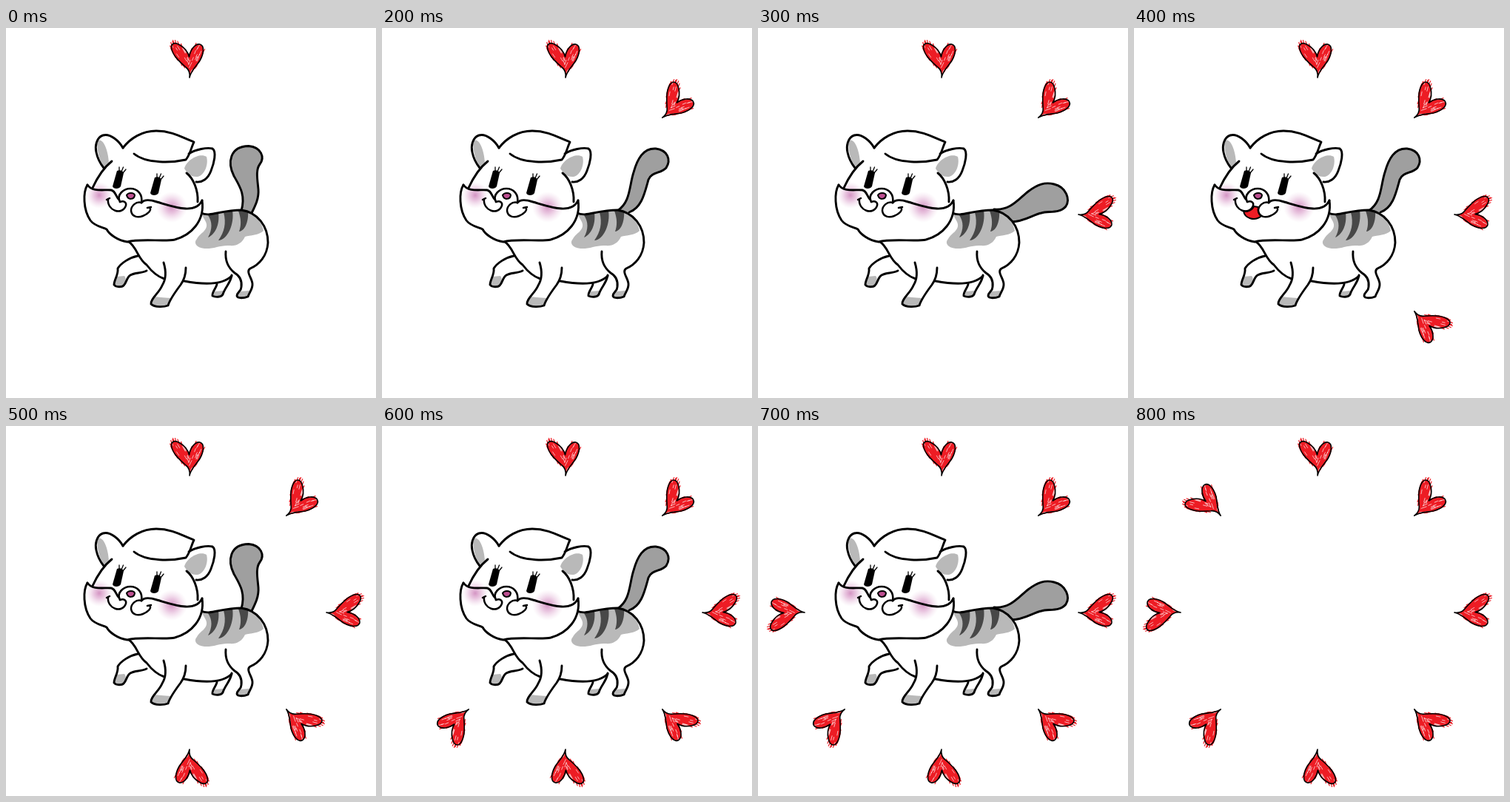
Write an HTML page that moves like this. It is 500 px wide and 500 px high and loops after 900 ms.

```html
<!DOCTYPE html>
<html lang="en">
<head>
<meta charset="utf-8">
<title>Cat with hearts</title>
<style>
html, body { margin: 0; width: 100%; height: 100%; overflow: hidden; background: #fff; }
svg { display: block; width: 100vw; height: 100vh; }
.line { fill: none; stroke: #000; stroke-width: 2.9; stroke-linecap: round; stroke-linejoin: round; }
.white { fill: #fff; }
.gray { fill: #b9b9b9; }
.dark { fill: #484848; }
</style>
</head>
<body>
<svg viewBox="0 0 500 500">
  <defs>
    <radialGradient id="blush">
      <stop offset="0" stop-color="#c979b4" stop-opacity=".8"/>
      <stop offset=".4" stop-color="#d796c6" stop-opacity=".55"/>
      <stop offset="1" stop-color="#e8c4de" stop-opacity="0"/>
    </radialGradient>
    <path id="heartShape" d="M248 67C249 60 247 56 243 53C235 46 225 37 223.500 27C223 20 229 19 235 23C242 27 246 33 247.500 39C249 30 255 21 262 22C269 24 267 35 262 44C257 52 250 57 248 67Z"/>
    <clipPath id="heartClip"><use href="#heartShape"/></clipPath>
    <clipPath id="legClip"><path d="M213 317C217 330 216 340 211 348C207 358 195 366 196 373C201 378 214 377 219 375C221 368 230 355 236 347C241 340 243 332 243 324Z"/></clipPath>
    <g id="heart">
      <use href="#heartShape" fill="#ed1c24"/>
      <path id="fringe" fill="none" stroke="#ed1c24" stroke-width="1.2" stroke-linecap="round"/>
      <path id="scratch" clip-path="url(#heartClip)" fill="none" stroke="#fff" stroke-width=".65"/>
      <use href="#heartShape" fill="none" stroke="#000" stroke-width="1.6" stroke-linejoin="round"/>
    </g>
    <g id="eye">
      <path d="M150 193C154 191 158 193 159 196L155 214C153 218 145 218 144 214Z"/>
      <path d="M153 194L153 188M156 194L158.5 188M158 196L162 191" fill="none" stroke="#000" stroke-width="1.3" stroke-linecap="round"/>
    </g>
  </defs>

  <g id="hearts"></g>

  <g id="cat">
    <path id="tail" class="line" style="fill:#9f9f9f"/>

    <!-- raised paw and far hind leg -->
    <path class="gray" d="M149 336L160 335C164 339 160 347 158 349C153 351 147 350 146 347Z"/>
    <path class="line" d="M178 308C167 310 155 318 151 325C152 334 146 340 146 347C149 351 157 350 159 348C163 344 163 337 168 334C175 330 182 332 190 328"/>
    <path class="gray" d="M282 356L294 355C295 361 290 364 280 363Z"/>
    <path class="line" d="M285 346C285 350 278 357 279 362C283 364 291 364 293 360C296 350 304 344 305 334"/>

    <!-- body -->
    <path class="white" d="M264 250C275 256 290 246 318 246C340 249 354 268 354 290C353 308 342 320 328 327L297 301Z"/>
    <path class="gray" d="M264 251C280 257 292 247 318 246C334 248 346 261 348 274C342 280 330 280 323 282C319 291 311 295 302 294C290 293 280 299 268 298C257 297 253 290 258 285C262 277 275 273 270 262Z"/>
    <path class="dark" d="M273 253C279 262 279 272 273 283C283 279 289 265 287 250ZM294 249C298 264 295 276 287 287C299 287 309 265 306 247ZM314 247C318 258 318 267 315 275C324 274 328 259 327 248Z"/>
    <path id="paw" class="gray" d="M315 356L329 355L327 363C322 366 312 366 312 362Z"/>
    <path class="line" d="M264 250C275 256 290 246 318 246C340 249 354 268 354 290C353 308 342 320 330 325C323 329 334 340 333 347C333 353 329 357 327 363C322 365 313 366 312 362C312 357 318 356 318 350C319 342 316 335 309 331C299 323 296 313 297 302"/>
    <path class="line" d="M166 289C177 296 178 312 190 320C196 328 205 336 214 339M241 342C262 346 291 349 305 335"/>

    <!-- front leg -->
    <g clip-path="url(#legClip)"><path class="gray" d="M190 362Q208 364 222 365V380H190Z"/></g>
    <path class="line" d="M213 317C217 330 216 340 211 348C207 358 195 366 196 373C201 378 214 377 219 375C221 368 230 355 236 347C241 340 243 332 243 324"/>

    <!-- ears -->
    <path class="gray" d="M124 152C131 148 138 164 139 182L133 188C126 180 122 163 124 152ZM241 190C244 178 262 168 271 174C274 185 268 199 259 201C250 202 245 196 241 190Z"/>
    <path class="line" d="M158 162C153 153 141 142 131 145C122 148 120 160 122 168C124 178 128 184 132 189"/>
    <path class="line" d="M247 170C256 164 272 161 279 163C285 167 281 183 277 193C273 204 265 209 257 208"/>

    <!-- face -->
    <path class="white" d="M110 212C104 222 104 245 114 260C120 268 130 270 136 272C139 278 150 287 164 289C180 284 215 289 228 286C250 280 268 262 265 233L203 215Z"/>
    <circle cx="126" cy="226" r="18" fill="url(#blush)"/>
    <circle cx="224" cy="242" r="21" fill="url(#blush)"/>
    <path class="line" d="M143 180C133 188 123 203 117 216M244 196C253 203 260 219 259 235"/>
    <path class="line" d="M158 162C168 149 184 139 203 139C225 139 240 149 254 154C250 162 249 171 243 178C225 182 190 184 173 170"/>
    <path class="line" d="M110 212C104 222 104 245 114 260C120 268 130 269 136 272C139 278 150 287 164 289C180 284 215 289 228 286C250 280 269 261 265 233"/>
    <path class="line" d="M110 212C117 222 132 218 142 219C149 221 148 228 153 232M183 236C187 231 195 232 204 235C225 241 256 253 265 233"/>
    <use href="#eye"/>
    <use href="#eye" x="51" y="9"/>
    <path id="mouth" class="line" style="fill:#ed1c24;stroke-width:2" d="M149 247C150 257 164 262 173 254C169 251 168 247 169 242L163 241C161 246 155 249 149 247Z"/>
    <path class="line white" style="stroke-width:2.6" d="M154 235C149 225 159 217 168 217C178 217 185 225 183 236"/>
    <path class="line" style="stroke-width:2.5" d="M136 232L140 230M138 231C136 247 157 254 162 240C163 236 160 233 154 235M183 236C176 234 169 240 169 247C170 255 178 257 185 254C192 251 196 247 195 243M191 243L196 242"/>
    <path d="M163 226C165 222 173 222 174 226C173 232 165 233 163 226Z" fill="#bd4f91" stroke="#000" stroke-width="2"/>
  </g>
</svg>
<script>
const LOOP = 900;
const $ = id => document.getElementById(id);

const TAILS = {
  up: "M318 247C324 226 316 214 308 200C299 182 302 160 328 159.500C345 161 350 175 343 184C337 192 340 206 341 218C342 230 337 240 332 250",
  mid: "M318 247C336 236 334 213 340 195C345 177 353 162 370 163C386 165 391 178 384 189C377 197 364 194 360 205C355 223 351 243 334 249",
  down: "M320 245C342 247 353 231 366 221C379 211 389 208 401 211C418 215 423 232 417 241C409 251 393 247 384 250C373 252 361 262 343 262"
};
const WAG = ["up", "mid", "down", "mid"];

// Seeded random numbers for the pencil strokes
let seed = 11;
function rand(min, max) {
  seed = (seed * 16807) % 2147483647;
  return min + (max - min) * seed / 2147483647;
}

// Strokes lean outwards on both halves of the heart
function stroke(x, y, halfLength) {
  const lean = (x < 247 ? 1 : -1) * rand(0.3, 0.6);
  const dx = halfLength * Math.sin(lean), dy = halfLength * Math.cos(lean);
  return `M${x - dx} ${y - dy}L${x + dx} ${y + dy}`;
}

function scribble() {
  const shape = $("heartShape");
  const length = shape.getTotalLength();
  let fringe = "", scratch = "";
  for (let i = 0; i < 40; i++) {
    const p = shape.getPointAtLength(length * rand(0.12, 0.92));
    fringe += stroke(p.x, p.y, rand(2.5, 5));
  }
  for (let i = 0; i < 44; i++) {
    scratch += stroke(rand(225, 267), rand(24, 60), rand(2, 4.5));
  }
  $("fringe").setAttribute("d", fringe);
  $("scratch").setAttribute("d", scratch);
}

function addHearts() {
  for (let i = 0; i < 8; i++) {
    const heart = document.createElementNS("http://www.w3.org/2000/svg", "use");
    heart.setAttribute("href", "#heart");
    heart.setAttribute("transform", `rotate(${i * 45} 248 252)`);
    $("hearts").append(heart);
  }
}

function show(node, on) {
  node.style.display = on ? "" : "none";
}

function draw(time) {
  // The first pose is held for two beats
  const step = Math.max(0, Math.floor((time % LOOP) / 100) - 1);
  const pose = WAG[step % 4];
  const smiling = step === 3;
  const shift = pose === "down" || smiling ? -1 : 0;
  [...$("hearts").children].forEach((heart, i) => show(heart, i <= step));
  show($("cat"), step < 7);
  show($("mouth"), smiling);
  show($("paw"), !smiling);
  $("cat").setAttribute("transform", `translate(${shift} 0)`);
  $("tail").setAttribute("d", TAILS[pose]);
}

scribble();
addHearts();
const start = performance.now();
function tick() {
  draw(performance.now() - start);
  requestAnimationFrame(tick);
}
tick();
</script>
</body>
</html>
```
